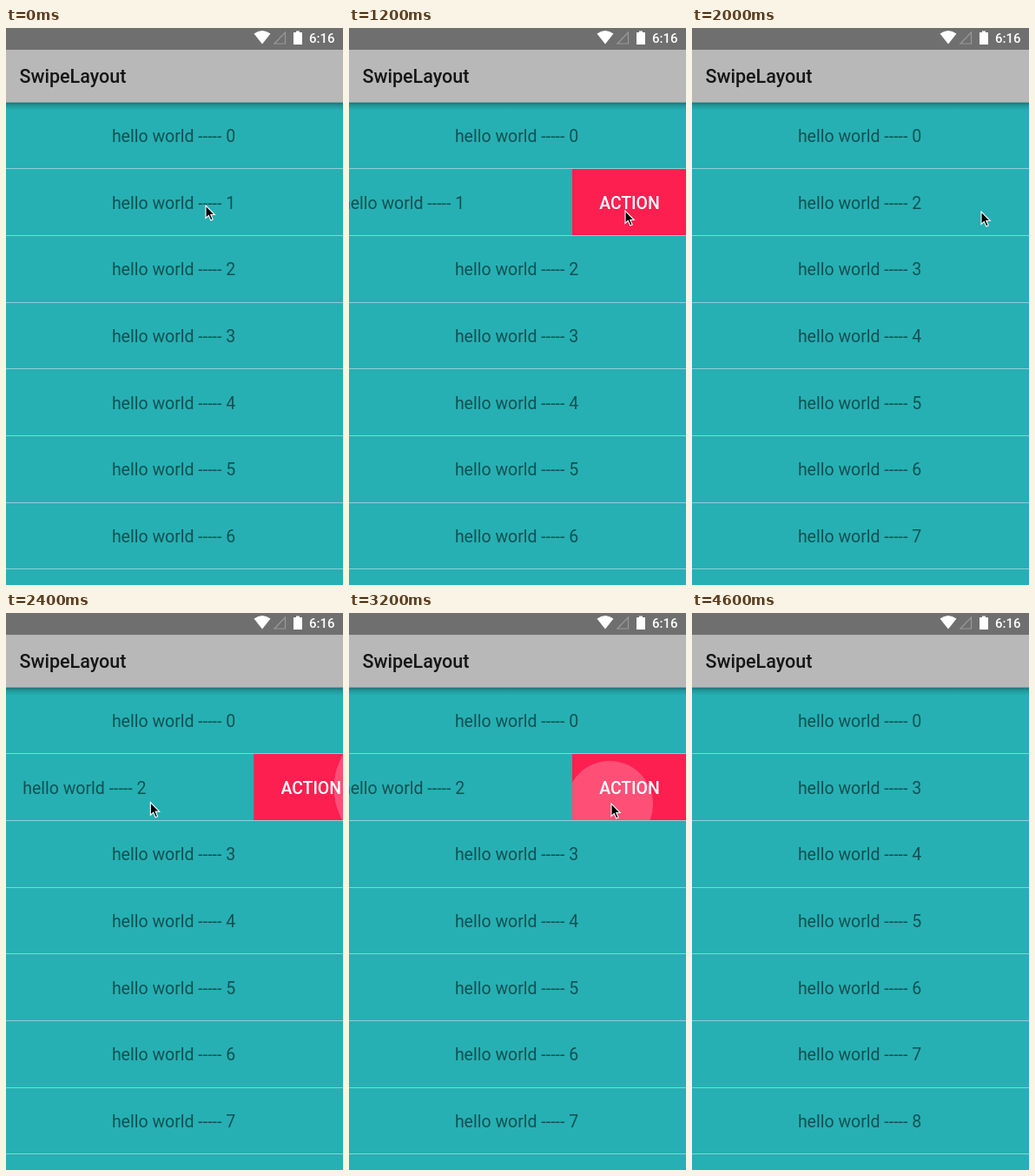
Recreate the animation shown at these times as an HTML page. Size 388x640 px, loop 4.8 s.

```html
<!DOCTYPE html>
<html lang="en">
<head>
<meta charset="utf-8">
<title>SwipeLayout</title>
<style>
  html, body { margin: 0; width: 100%; height: 100%; overflow: hidden; background: #26b0b3; }
  svg { display: block; width: 388px; height: 640px; font-family: Roboto, Inter, sans-serif; }
  .medium { font-weight: 500; }
  #rows text { font-size: 19.5px; text-anchor: middle; fill: #000; fill-opacity: .54; }
</style>
</head>
<body>
<svg viewBox="0 0 388 640">
  <defs>
    <linearGradient id="shade" x2="0" y2="1">
      <stop offset="0" stop-opacity=".36"/>
      <stop offset=".4" stop-opacity=".14"/>
      <stop offset="1" stop-opacity="0"/>
    </linearGradient>
    <clipPath id="button"><rect id="clip" y="162" width="131" height="76"/></clipPath>
  </defs>
  <rect width="388" height="640" fill="#26b0b3"/>
  <g id="rows"></g>

  <g id="action">
    <rect y="162" width="131" height="76" fill="#fd1f50"/>
    <text class="medium" x="66" y="207.5" font-size="19.4" text-anchor="middle" fill="#fff">ACTION</text>
  </g>
  <circle id="ripple" fill="#fff" fill-opacity=".22" clip-path="url(#button)"/>
  <g id="lines" fill="#8dd1d3"></g>

  <rect y="85.5" width="388" height="9" fill="url(#shade)"/>
  <rect width="388" height="25" fill="#6f6f6f"/>
  <rect y="25" width="388" height="60.5" fill="#b8b8b8"/>
  <text class="medium" x="15.5" y="63" font-size="21.5" fill="#151515">SwipeLayout</text>
  <path d="M285.5 6.5Q295 -.5 304.5 6.5L295 18.5Z" fill="#fff"/>
  <path d="M309 18H321.500V5Z" fill="none" stroke="#999" stroke-width="1.2"/>
  <path d="M331 5H334V3.500H338V5H341V19H331Z" fill="#fff"/>
  <text class="medium" x="349" y="17" font-size="15" fill="#fff">6:16</text>

  <path id="cursor" d="M0 0V14.500L3.300 11.400L5.800 17L8.200 16L5.800 10.500H10.300Z"
        stroke="#fff" stroke-width="1.1"/>
</svg>
<script>
const $ = id => document.getElementById(id);
const LOOP = 4800, STEP = 200, PITCH = 76.67, WIDTH = 388, BUTTON = 131, SLIDE = 200;

// Each swipe opens a row; tapping its button closes it and removes the row.
const swipes = [{ open: 200, close: 1760 }, { open: 2260, close: 3400 }];
const tapTime = swipe => swipe.close - 450;

// Places where the pointer rests or turns: [time, x, y]
const stops = [
  [200, 230, 204], [400, 180, 204], [1200, 318, 210], [1600, 318, 210], [2000, 333, 211],
  [2600, 108, 220], [2950, 300, 220], [3600, 306, 217], [4000, 300, 531]
];

function ease(p) {
  p = Math.min(1, Math.max(0, p));
  return p * p * (3 - 2 * p);
}

function pointer(t) {
  const b = stops.find(s => s[0] >= t) || stops.at(-1);
  const a = stops[stops.indexOf(b) - 1] || b;
  const p = ease((t - a[0]) / (b[0] - a[0] || 1));
  return [1, 2].map(i => a[i] + (b[i] - a[i]) * p);
}

function rippleAt(t) {
  for (const [i, swipe] of swipes.entries()) {
    const tap = tapTime(swipe);
    if (t > tap && t <= swipe.close) return [...pointer(tap), (t - tap) / 5];
    // The previous ripple fades out where the closed button was.
    if (i && t > swipe.open && t < swipe.open + 2 * SLIDE) return [WIDTH + BUTTON / 2, 201, 76];
  }
  return [0, 0, 0];
}

function set(el, attrs) {
  for (const name in attrs) el.setAttribute(name, attrs[name]);
  return el;
}

function add(parent, tag, attrs) {
  const el = document.createElementNS("http://www.w3.org/2000/svg", tag);
  return parent.appendChild(set(el, attrs));
}

const labels = [];
for (let i = 0; i < 7; i++) {
  labels.push(add($("rows"), "text", { x: 193, y: 131 + PITCH * i }));
  add($("lines"), "rect", { y: Math.round(161.3 + PITCH * i), width: WIDTH, height: 1 });
}

function draw(now) {
  const t = Math.floor(now % LOOP / STEP) * STEP;
  const removed = swipes.filter(s => t > s.close).length;
  const opened = swipes.reduce((sum, s) =>
    sum + ease((t - s.open) / SLIDE) - ease((t - s.close) / SLIDE), 0);
  const shift = -BUTTON * opened;

  labels.forEach((label, i) => {
    label.textContent = "hello world ----- " + (i && i + removed);
  });
  set(labels[1], { x: 193 + shift });
  set($("action"), { transform: `translate(${WIDTH + shift})` });
  set($("clip"), { x: WIDTH + shift });

  const [cx, cy, r] = rippleAt(t);
  set($("ripple"), { cx, cy, r });
  set($("cursor"), {
    transform: `translate(${pointer(t)})`,
    visibility: t > stops.at(-1)[0] ? "hidden" : "visible"
  });
  requestAnimationFrame(draw);
}
draw(0);
</script>
</body>
</html>
```
